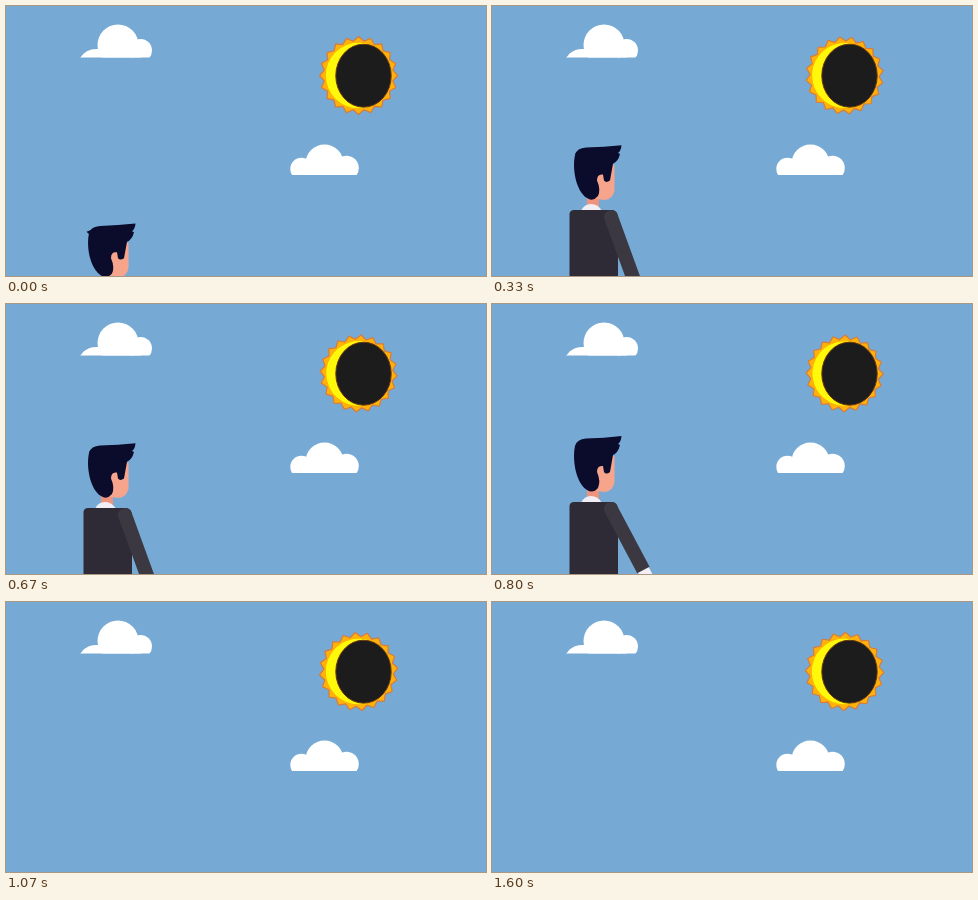
Recreate the animation shown at these times as an HTML page. Size 480x270 px, loop 1670 ms.

```html
<!DOCTYPE html>
<html lang="en">
<head>
<meta charset="utf-8">
<title>Watching the eclipse</title>
<style>
html, body { margin: 0; height: 100%; overflow: hidden; background: #76aad5; }
svg { display: block; width: 100%; height: 100%; }
</style>
</head>
<body>
<svg viewBox="0 0 480 270">
  <defs>
    <clipPath id="high"><path d="M0 0H200V51.5H0z"/></clipPath>
    <clipPath id="low"><path d="M200 0H480V169H200z"/></clipPath>
  </defs>

  <g fill="#fff" clip-path="url(#high)">
    <circle cx="112" cy="39" r="20.5"/>
    <circle cx="134.500" cy="44.500" r="11.500"/>
    <path d="M74 52Q80 42 93 43L135 40V52z"/>
  </g>
  <g fill="#fff" clip-path="url(#low)">
    <circle cx="295.500" cy="163" r="11.200"/>
    <circle cx="318.500" cy="157.500" r="19"/>
    <circle cx="340.500" cy="162" r="12.300"/>
    <path d="M296 158H341V170H296z"/>
  </g>

  <g id="sun" stroke-linejoin="round">
    <path id="rays" fill="#ffb20c" stroke="#d67c3c" stroke-width="1.2"/>
    <circle r="33" fill="#fff80a" stroke="#ffb000"/>
  </g>
  <ellipse cx="357.500" cy="69.700" rx="27.700" ry="31.500" fill="#1c1c1c" stroke="#6b3512"/>

  <g id="man">
    <g id="head">
      <path fill="#ee937d" d="M95 180H107V196H95z"/>
      <path fill="#f6a48c" d="M104 152H122.500V178Q121 187 113 188L104 187z"/>
      <g fill="#0b0b2c">
        <path d="M83 142Q85 135 94 134.500Q112 134 129.500 132Q129 138 126 140L128 141Q126 149 121 151L118 168Q114 171 112 168L111 162Q105 161 105 168Q109 177 106 184Q101 190 95 186C84 179 80 156 83 142z"/>
        <path id="tuft" d="M80.500 140.500L91 136L85 145z"/>
      </g>
    </g>
    <path fill="#f1eff5" d="M89 199Q92 192 99 192Q106 192 110 199z"/>
    <path fill="#2e2b36" d="M77.500 300V202Q78 198 82 198H121Q126 199 126 206V300z"/>
    <g id="arm">
      <path fill="#f1eff5" d="M-6 68H6V80H-6z"/>
      <path fill="#3b3842" d="M-7 0A7 7 0 0 1 7 0V69H-7z"/>
    </g>
  </g>
</svg>
<script>
const FRAMES = 25, STEP = 66.7, TEETH = 20;
const el = id => document.getElementById(id);
const transform = (id, value) => el(id).setAttribute('transform', value);

const rayPoints = Array.from({ length: TEETH * 2 }, (_, i) => {
  const angle = i * Math.PI / TEETH - Math.PI / 2;
  const radius = i % 2 ? 34.5 : 38.8;
  return [radius * Math.cos(angle), radius * Math.sin(angle)];
});
el('rays').setAttribute('d', `M${rayPoints.join('L')}z`);

function draw(frame) {
  // Two teeth pass per loop while the disc pulses three times.
  const turn = -frame / FRAMES * 2 * 360 / TEETH;
  const pulse = 1 - 0.01 * Math.cos((frame - 3) / FRAMES * 6 * Math.PI);
  transform('sun', `translate(352.6 69.5) rotate(${turn}) scale(${pulse})`);

  // He pops up, dips, then leaves along the same path reversed.
  const phase = Math.min(frame, 15 - frame);
  const dip = (phase - 3) / 4;
  const drop = dip < 0 ? 148 * dip * dip : 12 * dip * dip * (3 - 2 * dip);
  const crouch = Math.min(1, drop / 12);
  transform('man', `translate(0 ${drop})`);
  transform('head', `translate(0 190) scale(1 ${1 - 0.04 * crouch}) translate(0 -190)`);
  transform('tuft', `translate(${5 * (1 - crouch)} 0)`);
  transform('arm', `translate(119 205) rotate(${16 * crouch - 28})`);
}

const start = performance.now();
function tick() {
  const t = (performance.now() - start) % 1670;
  draw(Math.floor((t + 6) / STEP) % FRAMES);
  requestAnimationFrame(tick);
}
tick();
</script>
</body>
</html>
```
